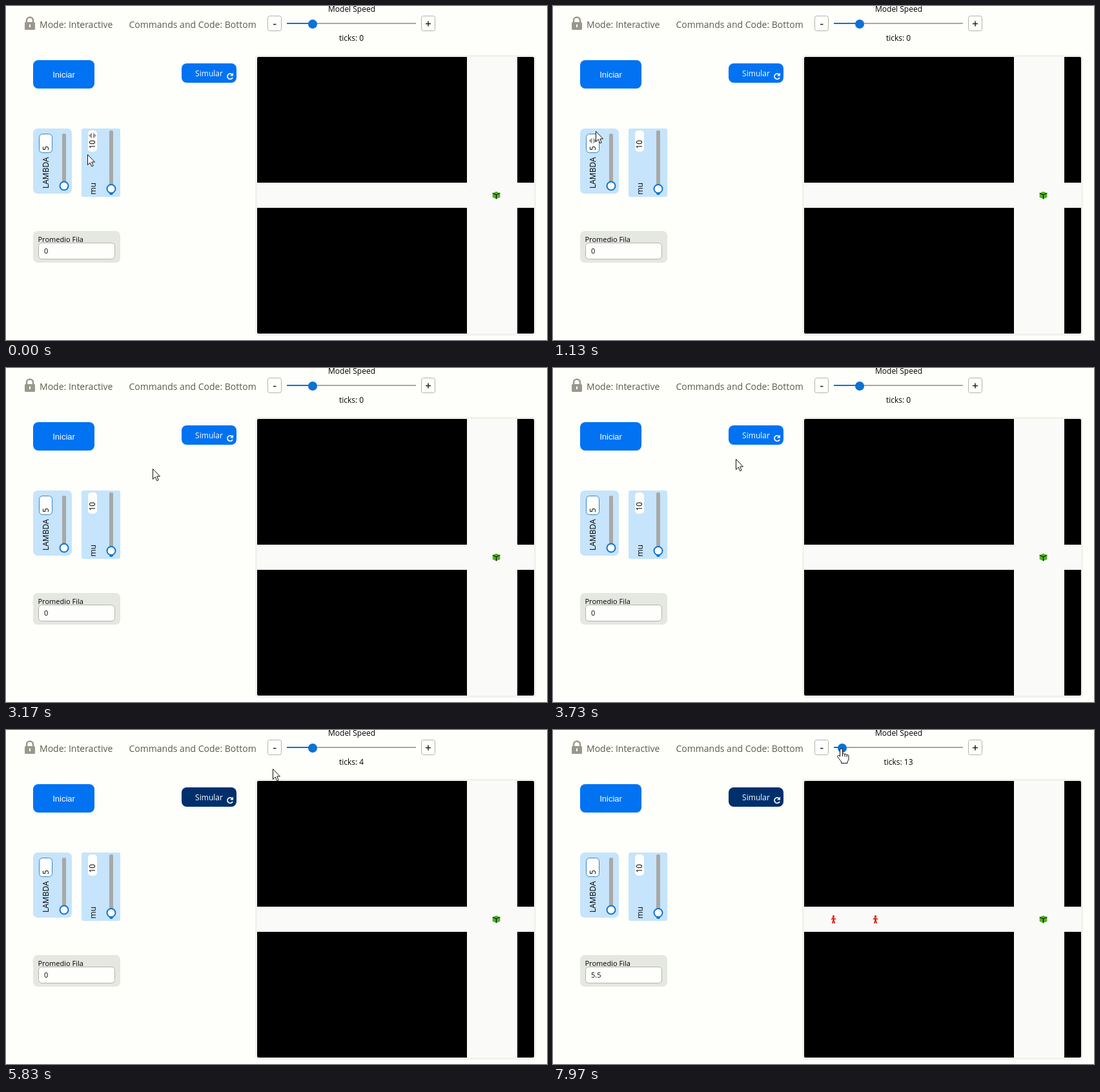
Recreate the animation shown at these times as an HTML page. Size 838 by 518 pixels, loop 8 s.

```html
<!DOCTYPE html>
<html lang="es">
<head>
<meta charset="utf-8">
<style>
  html, body { margin: 0; width: 100%; height: 100%; overflow: hidden; background: #fefefa; }
  svg { display: block; }
  text { font: 12px "Open Sans", sans-serif; }
  .menu { font-size: 14px; fill: #5c5b48; }
  .small { font-size: 11px; }
  .start { font: 13px "Liberation Sans", sans-serif; }
  .mid { text-anchor: middle; }
  .white { fill: #fff; }
  .blue { fill: #0072f2; }
  .accent { fill: #0a72d2; }
  .panel { fill: #c6e4fb; }
  .input { fill: #fefefc; }
  .grey { fill: #a8a8a6; }
  .olive { fill: #9a988c; }
  .thumb { fill: #fefefc; stroke: #0a72d2; stroke-width: 2; }
  .edge { stroke: #b4b3ac; }
  .person { fill: #d4261c; }
  .cursor { fill: #fff; stroke: #111; stroke-linejoin: round; }
</style>
</head>
<body>
<svg width="838" height="518" viewBox="0 0 838 518">
  <defs>
    <g id="person" transform="scale(.04333) translate(-150 -150)">
      <circle cx="150" cy="45" r="40"/>
      <path d="M105 90L120 195 90 285 105 300H135L150 225 165 300H195L210 285 180 195 195 90ZM127 79H172V94H127ZM195 90L240 150 225 180 165 105ZM105 90L60 150 75 180 135 105Z"/>
    </g>
    <path id="arrows" class="olive" d="M-1 -4.5V4.5L-6 0ZM1 -4.5V4.5L6 0Z"/>
  </defs>

  <!-- toolbar -->
  <path d="M32 26V22a5 4.5 0 0 1 10 0V26" fill="none" stroke="#9a988c" stroke-width="2.5"/>
  <rect class="olive" x="29" y="25" width="16" height="12" rx="1.5"/>
  <path d="M37 28.500V33" stroke="#fefefa" stroke-width="2"/>
  <text class="menu" x="52" y="34">Mode: Interactive</text>
  <text class="menu" x="190.500" y="34">Commands and Code: Bottom</text>
  <text class="mid" x="535.500" y="9">Model Speed</text>
  <g class="input edge">
    <rect x="405.500" y="15.500" width="21" height="23" rx="3"/>
    <rect x="643.500" y="15.500" width="21" height="23" rx="3"/>
  </g>
  <path d="M414 28.500H418.500M650 27.500H658M654 23.500V31.500" stroke="#222" stroke-width="1.500"/>
  <rect class="grey" x="435" y="26" width="200" height="2"/>
  <rect id="speedFill" class="accent" x="435" y="26" height="2"/>
  <circle id="speedThumb" class="accent" cy="28" r="7"/>
  <text id="ticks" class="mid" x="535" y="54"></text>

  <!-- buttons -->
  <rect class="blue" x="42" y="84" width="95" height="44" rx="8"/>
  <text class="start white mid" x="89.500" y="111">Iniciar</text>
  <rect id="simular" x="272" y="89" width="85" height="30" rx="8"/>
  <text class="white mid" x="314.500" y="109">Simular</text>
  <path d="M350.500 106.500A4.200 4.200 0 1 0 351 111" fill="none" stroke="#fff" stroke-width="1.700"/>
  <path class="white" d="M352 103.500V108.500H347Z"/>

  <!-- sliders -->
  <rect class="panel" x="42" y="190" width="60" height="101" rx="7"/>
  <rect class="input" x="51.500" y="198.500" width="20" height="29" rx="5" stroke="#3683c5"/>
  <text transform="translate(66 283) rotate(-90)">LAMBDA</text>
  <text transform="translate(66 224) rotate(-90)">5</text>
  <use id="lambdaArrows" href="#arrows" x="61.500" y="209"/>
  <rect class="grey" x="87" y="198" width="6" height="84" rx="2"/>
  <circle class="thumb" cx="90" cy="279" r="6.500"/>

  <rect class="panel" x="117" y="190" width="60" height="106" rx="3"/>
  <rect class="input" x="127" y="193" width="14" height="33" rx="5"/>
  <text transform="translate(138.500 292.500) rotate(-90)">mu</text>
  <text transform="translate(138 221.500) rotate(-90)">10</text>
  <use id="muArrows" href="#arrows" x="134" y="201"/>
  <rect class="grey" x="160" y="193" width="6" height="92" rx="2"/>
  <circle class="accent" cx="163" cy="290" r="3"/>
  <circle class="thumb" cx="163" cy="283.500" r="6.500"/>

  <!-- monitor -->
  <rect x="42" y="349" width="135" height="49" rx="7" fill="#e5e7e1"/>
  <text class="small" x="49.500" y="366">Promedio Fila</text>
  <rect class="input edge" x="50.500" y="367.500" width="118" height="25" rx="5"/>
  <text id="average" class="small" x="59" y="384"></text>

  <!-- world -->
  <rect x="387.500" y="77.500" width="432" height="432" rx="4" fill="#fafaf9" stroke="#f2f2ec" stroke-width="3"/>
  <path d="M391 79H714V274H389V81Q389 79 391 79ZM792 79H816Q818 79 818 81V274H792ZM389 313H714V508H391Q389 508 389 506ZM792 313H818V506Q818 508 816 508H792Z"/>
  <g transform="translate(759.500 293.500) scale(.04333) translate(-150 -150)">
    <path fill="#4fb022" d="M150 285L285 225V75L150 15 15 75V225Z"/>
    <path fill="none" stroke="#000" stroke-width="23" d="M150 285V135L15 75M150 135L285 75"/>
  </g>
  <use class="person" href="#person" y="293.500"/>
  <use class="person" href="#person" y="293.500"/>

  <g id="pointer" class="cursor">
    <path id="arrow" d="M.5 .5V16.500L4.200 13 6.800 18.800 9.200 17.700 6.700 12H11.500Z"/>
    <path id="beam" fill="none" d="M-3 -7H-1L0 -6 1 -7H3M0 -6V6M-3 7H-1L0 6 1 7H3"/>
    <path id="hand" transform="translate(-1.500 -1)" d="M-2 2Q-2 0 0 0T2 2V8Q4 6.500 5.500 8.500 7.500 7.500 8.500 9.500 11 8.500 11.500 11V16Q11.500 18 9.500 20V22.500H0V20L-5.500 13Q-6.500 11 -5 10.500T-2 12ZM2 8V12M5.500 8.500V12.500M8.500 9.500V13"/>
  </g>
</svg>
<script>
const LOOP = 8000;
const el = id => document.getElementById(id);
const people = [...document.querySelectorAll("use.person")];
const show = (node, on) => node.style.display = on ? "" : "none";

// time, x, y of the pointer
const path = [
  [0, 126, 230], [30, 126, 230], [600, 88, 212], [1130, 66, 194], [1670, 60, 198],
  [2000, 53, 206], [2330, 58, 222], [2530, 62, 207], [3170, 227, 156],
  [3400, 252, 168], [4070, 315, 112], [5370, 315, 112], [6170, 475, 27],
  [6270, 475, 27], [6800, 472, 28], [7000, 472, 28], [7330, 461, 29],
  [7530, 461, 29], [7970, 448, 30], [LOOP, 448, 30]
];

function pointerAt(t) {
  const i = path.findIndex(key => key[0] > t);
  const [a, b] = [path[i - 1], path[i]];
  const u = (t - a[0]) / (b[0] - a[0]);
  const k = u * u * (3 - 2 * u);
  return [a[1] + (b[1] - a[1]) * k, a[2] + (b[2] - a[2]) * k];
}

// The model slows down once the speed slider is dragged.
function tickAt(t) {
  if (t < 5200) return 0;
  if (t < 7000) return Math.min(10, 1 + Math.floor((t - 5200) / 160));
  return t < 7330 ? 11 : t < 7740 ? 12 : 13;
}

function draw(t) {
  const [x, y] = pointerAt(t);
  const inside = (x0, y0, x1, y1) => x >= x0 && x < x1 && y >= y0 && y < y1;
  const overSimular = inside(272, 89, 357, 119);
  const inField = inside(51, 198, 72, 228);
  const onHand = overSimular || inside(435, 18, 635, 38);

  el("pointer").setAttribute("transform", `translate(${Math.round(x)} ${Math.round(y)})`);
  show(el("hand"), onHand);
  show(el("beam"), inField);
  show(el("arrow"), !onHand && !inField);
  show(el("lambdaArrows"), inside(42, 190, 77, 235));
  show(el("muArrows"), inside(117, 190, 145, 240));
  el("simular").setAttribute("fill", t >= 5130 ? "#00306c" : overSimular ? "#0080ff" : "#0072f2");

  const speed = t < 6270 ? 475 : Math.min(475, x);
  el("speedThumb").setAttribute("cx", speed);
  el("speedFill").setAttribute("width", speed - 435);

  const tick = tickAt(t);
  const columns = [tick - 5, tick - 10];
  people.forEach((person, i) => {
    show(person, columns[i] > 0);
    person.setAttribute("x", 395.5 + 13 * columns[i]);
  });
  const active = columns.filter(c => c > 0);
  el("ticks").textContent = "ticks: " + tick;
  el("average").textContent = active.length ? active.reduce((a, b) => a + b) / active.length : 0;
}

const start = performance.now();
function frame() {
  draw((performance.now() - start) % LOOP);
  requestAnimationFrame(frame);
}
frame();
</script>
</body>
</html>
```
